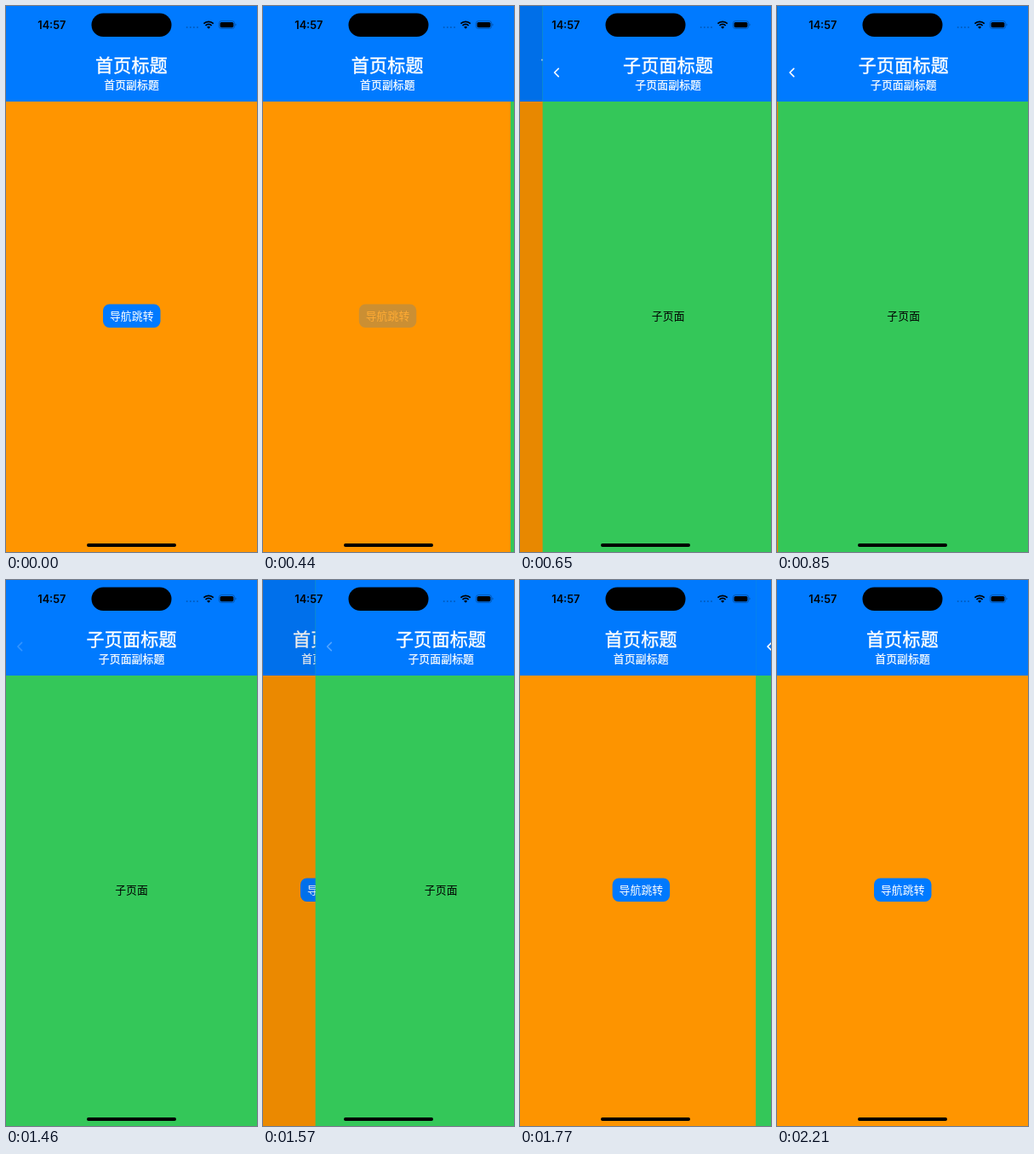
An HTML page for the animation above (2.33 s loop, 295x640 px).

```html
<!DOCTYPE html>
<html lang="zh-CN">
<head>
<meta charset="utf-8">
<title>导航跳转</title>
<style>
  html, body { margin: 0; width: 100%; height: 100%; overflow: hidden; background: #ff9500; }
  svg { display: block; width: 295px; height: 640px; }
  text { text-anchor: middle; letter-spacing: .15px; font: 12.8px "Noto Sans CJK SC", "Noto Sans CJK JP", sans-serif; }
  .title, .sub { fill: #fff; stroke: #fff; }
  .title { font-size: 21px; letter-spacing: .25px; stroke-width: .4px; }
  .sub { stroke-width: .25px; }
  .clock { font: 600 12.75px Inter, "Liberation Sans", sans-serif; letter-spacing: 0; }
</style>
</head>
<body>
<svg viewBox="0 0 295 640">
  <g id="home">
    <rect width="295" height="640" fill="#ff9500"/>
    <rect width="295" height="112" fill="#007aff"/>
    <text class="title" x="147.6" y="77">首页标题</text>
    <text class="sub" x="147.6" y="97.4">首页副标题</text>
    <g id="button">
      <rect x="114" y="349.5" width="67.5" height="27.5" rx="7.5" fill="#007aff"/>
      <text x="147.8" y="368.3" fill="#fff">导航跳转</text>
    </g>
  </g>
  <rect id="dim" width="295" height="640"/>
  <g id="child">
    <rect width="295" height="640" fill="#34c759"/>
    <rect width="295" height="112" fill="#007aff"/>
    <path id="back" d="M18.6 73.4 L13.9 78 L18.6 82.6" fill="none" stroke="#fff" stroke-width="1.6" stroke-linecap="round" stroke-linejoin="round"/>
    <text class="title" x="147.6" y="77">子页面标题</text>
    <text class="sub" x="147.6" y="97.4">子页面副标题</text>
    <text x="147.6" y="368.3">子页面</text>
  </g>
  <g id="status">
    <text class="clock" x="53.8" y="26.6">14:57</text>
    <rect x="100.5" y="8.5" width="94" height="27.6" rx="13.8"/>
    <g opacity=".25">
      <circle cx="212.7" cy="25" r="1"/>
      <circle cx="216.8" cy="25" r="1"/>
      <circle cx="220.9" cy="25" r="1"/>
      <circle cx="225" cy="25" r="1"/>
    </g>
    <g fill="none" stroke="#000" stroke-width="1.7">
      <path d="M232.4 20.7 A8 8 0 0 1 243.8 20.7"/>
      <path d="M234.5 23 A5 5 0 0 1 241.7 23"/>
    </g>
    <path d="M238.1 26.8 L236.1 24.7 A2.9 2.9 0 0 1 240.1 24.7 Z"/>
    <rect x="250.3" y="17.6" width="18.4" height="8.9" rx="2.8" fill="none" stroke="#000" stroke-width=".8" opacity=".35"/>
    <rect x="251.6" y="18.9" width="15.8" height="6.3" rx="1.7"/>
    <path d="M269.6 20.6 A1.6 1.6 0 0 1 269.6 23.5 Z" opacity=".4"/>
    <rect x="95" y="630.1" width="105" height="3.8" rx="1.9"/>
  </g>
</svg>
<script>
  const LOOP = 2330, WIDTH = 295;
  const PUSH = 430.4, POP = 1523.6, RATE = 0.0183;
  // The screen refreshes only at these times.
  const ticks = [0, 440, 550, 650, 750, 850, 1120, 1460, 1570, 1670, 1770, 1870, 1970, 2210];
  const [home, button, dim, child, back] =
    ['home', 'button', 'dim', 'child', 'back'].map(id => document.getElementById(id));

  // Critically damped spring: share of the way still to go.
  function rest(ms) {
    const u = Math.max(0, ms) * RATE;
    return (1 + u) * Math.exp(-u);
  }

  function childShare(t) {
    if (t < 440 || t >= 2210) return 1;
    if (t < 1120) return rest(t - PUSH);
    return 1 - rest(t - POP);
  }

  function ramp(t, start, end, from) {
    const p = Math.min(1, Math.max(0, (t - start) / (end - start)));
    return from + (1 - from) * p;
  }

  const slide = (node, x) => node.setAttribute('transform', `translate(${x.toFixed(2)} 0)`);

  function draw(time) {
    const now = time % LOOP;
    const t = ticks.filter(s => s <= now).pop();
    const x = childShare(t);
    slide(child, x * WIDTH);
    slide(home, (x - 1) * WIDTH * 0.3);
    dim.setAttribute('opacity', 0.1 * (1 - x));
    button.setAttribute('opacity', t < 440 ? 1 : ramp(t, 440, 733, 0.2));
    back.setAttribute('opacity', t < 1460 ? 1 : ramp(t, 1540, 1740, 0.2));
  }

  const start = performance.now();
  function frame() {
    draw(performance.now() - start);
    requestAnimationFrame(frame);
  }
  draw(0);
  requestAnimationFrame(frame);
</script>
</body>
</html>
```
